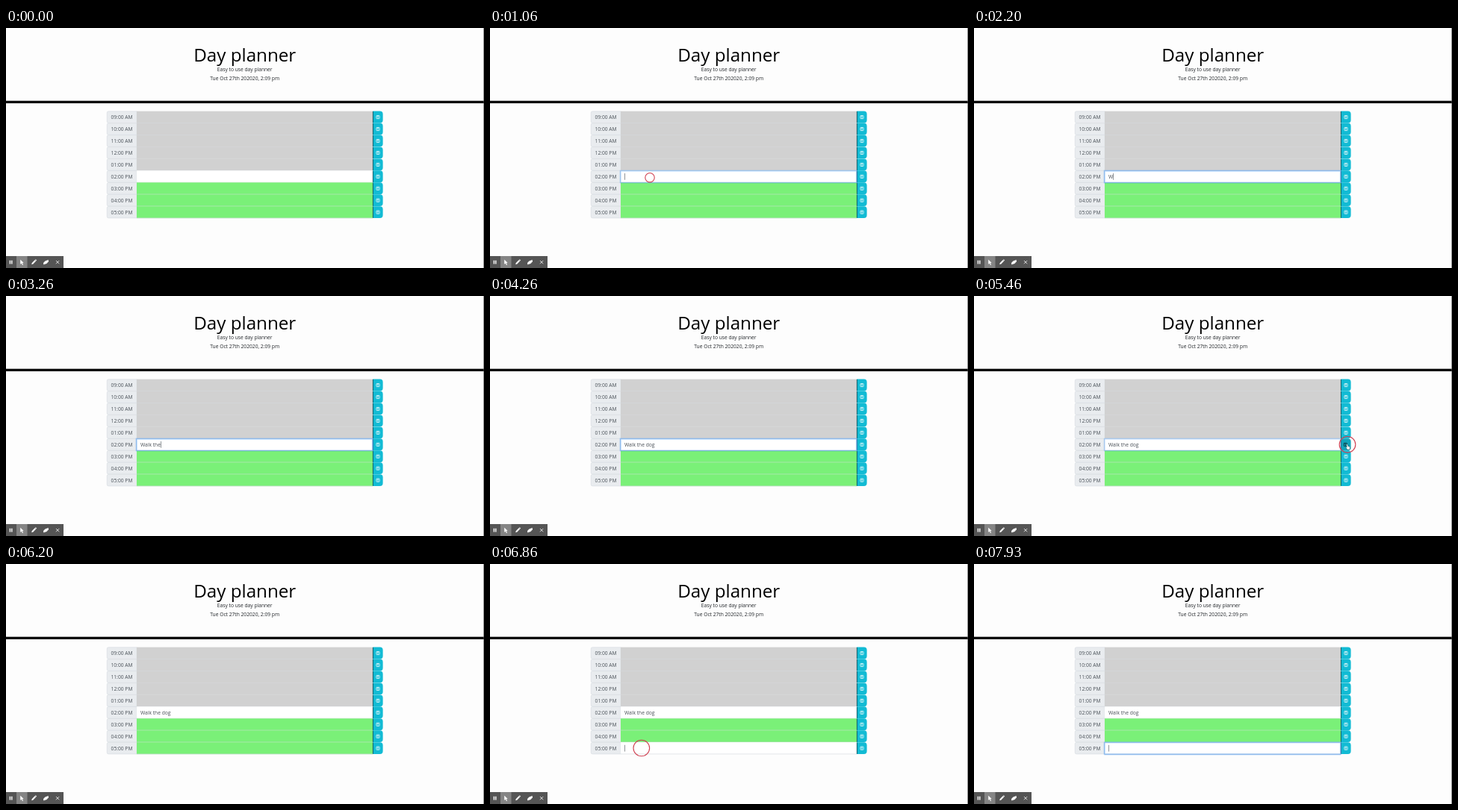
Recreate the animation shown at these times as an HTML page with a canvas. Size 640 by 322 pixels, loop 8 s.

```html
<!DOCTYPE html>
<html lang="en">
<head>
<meta charset="utf-8">
<title>Day planner</title>
<style>
html, body { margin: 0; width: 100%; height: 100%; overflow: hidden; background: #fdfdfd; }
canvas { display: block; width: 640px; height: 322px; }
</style>
</head>
<body>
<canvas id="stage"></canvas>
<script>
const canvas = document.getElementById('stage');
const dpr = window.devicePixelRatio || 1;
canvas.width = 640 * dpr;
canvas.height = 322 * dpr;
const ctx = canvas.getContext('2d');
ctx.scale(dpr, dpr);

const LOOP = 8000, TOP = 111.6, ROW = 15.95, BLINK = 530;
const HOURS = ['09:00 AM', '10:00 AM', '11:00 AM', '12:00 PM', '01:00 PM',
  '02:00 PM', '03:00 PM', '04:00 PM', '05:00 PM'];
const NOTE = 'Walk the dog';
const KEYS = [2200, 2400, 2600, 2730, 2930, 3060, 3130, 3260, 3400, 3530, 3660, 3730];
// press, release, x, y
const CLICKS = [[1000, 1000, 214, 200.7], [5400, 5460, 500, 199.3], [6860, 6860, 202.8, 247]];

const clamp = v => Math.max(0, Math.min(1, v));
const ease = (t, start) => { const p = clamp((t - start) / 150); return p * p * (3 - 2 * p); };

function rect(x, y, w, h, fill) {
  ctx.fillStyle = fill;
  ctx.fillRect(x, y, w, h);
}
function box(x, y, w, h, radii, fill, stroke) {
  ctx.beginPath();
  ctx.roundRect(x, y, w, h, radii);
  ctx.fillStyle = fill;
  ctx.fill();
  if (stroke) line(stroke, 0.5);
}
function line(color, width) {
  ctx.strokeStyle = color;
  ctx.lineWidth = width;
  ctx.stroke();
}
function shape(d, fill) {
  ctx.fillStyle = fill;
  ctx.fill(new Path2D(d));
}
function text(s, x, y, size, color, align = 'center') {
  ctx.font = size + 'px "Open Sans", sans-serif';
  ctx.fillStyle = color;
  ctx.textAlign = align;
  ctx.fillText(s, x, y);
}

function header() {
  rect(0, 0, 640, 322, '#fdfdfd');
  text('Day planner', 319.7, 45, 24.2, '#000');
  text('Easy to use day planner', 319.7, 58.2, 6.7, '#212529');
  text('Tue Oct 27th 202020, 2:09 pm', 319.7, 70.2, 6.7, '#212529');
  rect(0, 97.7, 640, 3.3, '#000');
  rect(639.4, 0, 0.6, 322, '#555');
}

function saveButton(y, hover) {
  box(491, y, 13.6, ROW - 0.1, [0, 4, 4, 0], hover ? '#12a5bb' : '#12bbd4');
  rect(490.9, y + 0.4, 0.8, ROW - 0.8, '#17464e');
  const ink = hover ? '#12343a' : '#e8fafc', cy = y + ROW / 2;
  const cx = hover ? 497.2 : 498;
  ctx.beginPath();
  ctx.roundRect(cx - 2.1, cy - 2.1, 4.2, 4.2, 0.6);
  line(ink, 0.8);
  rect(cx - 1.3, cy - 1.4, 2.3, 0.9, ink);
  ctx.beginPath();
  ctx.arc(cx, cy + 0.8, 0.7, 0, 7);
  ctx.fillStyle = ink;
  ctx.fill();
}

function rows(t) {
  HOURS.forEach((hour, i) => {
    const y = TOP + i * ROW;
    const white = i === 5 || (i === 8 && t >= 6860);
    box(135.2, y + 0.2, 40, ROW - 0.4, [2, 0, 0, 2], '#e9ecef', '#ced4da');
    text(hour, 155, y + 10.3, 6.7, '#495057');
    rect(175, y, 316, ROW, white ? '#fff' : i < 5 ? '#d1d1d1' : '#7af078');
    rect(175, y + ROW - 0.5, 316, 0.6, '#ced4da');
    saveButton(y, i === 5 && t >= 5200 && t < 6060);
  });
}

function focusRing(row, alpha) {
  if (!alpha) return;
  ctx.globalAlpha = alpha;
  ctx.beginPath();
  ctx.rect(174.7, TOP + row * ROW + 0.2, 316.2, ROW);
  line('rgba(0,123,255,.22)', 2.2);
  line('#80b0e6', 0.8);
  ctx.globalAlpha = 1;
}

function field(t) {
  const typed = KEYS.filter(k => k <= t);
  const note = NOTE.slice(0, typed.length);
  text(note, 180, TOP + 5 * ROW + 10.4, 6.7, '#495057', 'left');
  focusRing(5, ease(t, 1000 - 40) * (1 - ease(t, 5400)));
  focusRing(8, ease(t, 6860));

  const late = t >= 6860;
  if (!late && (t < 1000 || t >= 5400)) return;
  const since = late ? 6860 : typed.at(-1) ?? 1000;
  if (Math.floor((t - since) / BLINK) % 2) return;
  const x = late ? 180.2 : 180.2 + ctx.measureText(note).width;
  rect(x, TOP + (late ? 8 : 5) * ROW + 3.6, 0.6, 8.8, '#495057');
}

function pointer(t) {
  if (t >= 5200 && t < 6060) {
    const hand = 'M499 199.2q.8-.6 1.1.4l.4 2 2.2.7q.8.3.6 1.3l-.5 2.4h-2.7l-1.9-2.5q.2-.8 1.2-.2z';
    ctx.lineJoin = 'round';
    ctx.strokeStyle = '#1b2c30';
    ctx.lineWidth = 0.7;
    ctx.stroke(new Path2D(hand));
    shape(hand, '#f4f4f4');
  }
  for (const [press, release, x, y] of CLICKS) {
    const r = 10.9 * (1 - clamp((t - release) / 142));
    if (t < press || r < 0.5) continue;
    ctx.beginPath();
    ctx.arc(x, y, r, 0, 7);
    line('#cf3f50', 1.1);
  }
}

function toolbar() {
  rect(0, 306, 77, 16, '#555');
  rect(14, 306, 14.5, 16, '#858585');
  rect(4.7, 311.8, 1.4, 4.8, '#fff');
  rect(7.1, 311.8, 1.4, 4.8, '#fff');
  shape('M19.2 310.8l4.6 4.4-2 .1 1.2 2.5-1 .5-1.2-2.6-1.6 1.4z', '#fff');
  shape('M34.2 317.2l.5-2 3.9-3.9 1.5 1.5-3.9 3.9zM39 310.9l.7-.6 1.5 1.5-.7.6z', '#fff');
  shape('M50 315.2l2.2-2.5 4.5-1.8.2 2.4-2.3 2.7-4.3 1.5z', '#fff');
  ctx.beginPath();
  for (const s of [-1, 1]) {
    ctx.moveTo(67, 314.2 - 2.1 * s);
    ctx.lineTo(71.2, 314.2 + 2.1 * s);
  }
  line('#fff', 0.8);
}

function frame(now) {
  const t = now % LOOP;
  header();
  rows(t);
  field(t);
  pointer(t);
  toolbar();
  requestAnimationFrame(frame);
}
requestAnimationFrame(frame);
</script>
</body>
</html>
```
